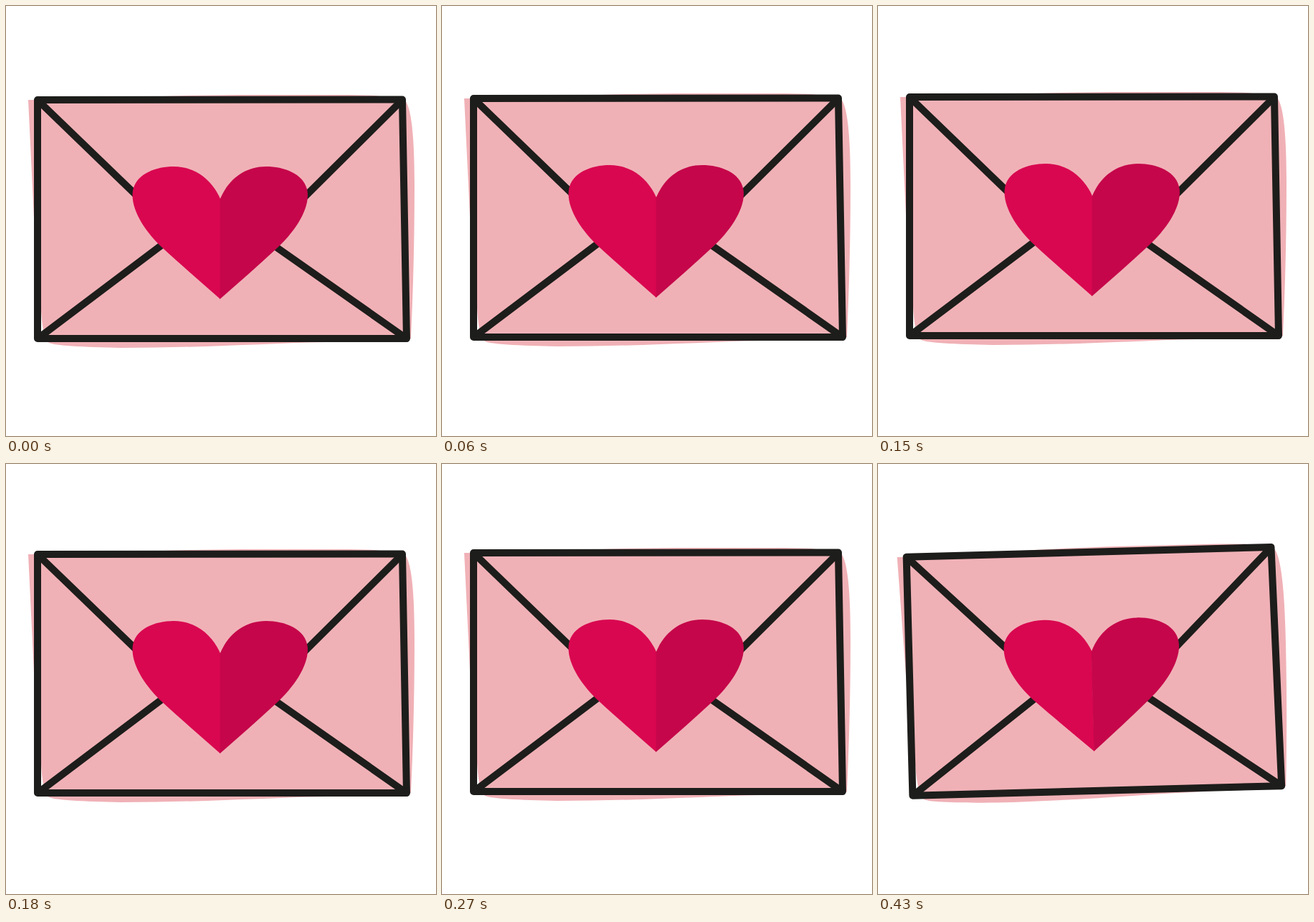
An HTML page for the animation above (630 ms loop, 600 by 600 pixels).

```html
<!DOCTYPE html>
<html lang="en">
<head>
<meta charset="utf-8">
<title>Love letter</title>
<style>
html, body { margin: 0; width: 100%; height: 100%; overflow: hidden; background: #fff; }
svg { display: block; width: 100%; height: 100%; }
</style>
</head>
<body>
<svg viewBox="0 0 600 600">
  <g id="letter">
    <path fill="#f0b1b6" d="M31 131 L44 131 L254 125 L327 124 H478 L515 125 L553 130
      C564 131 570 170 570 250 C570 330 568 400 565 464 L445 469
      C360 471 270 477 160 477 C110 476 62 474 59 469 C52 463 50 440 49 424 L39 296 Z"/>
    <g fill="none" stroke="#1d1d1b" stroke-width="10" stroke-linecap="round" stroke-linejoin="round">
      <path d="M47 134 L190 272 M550 134 L405 278 M47 462 L230 324 M556 462 L365 328"/>
      <path d="M44 131 L553 130.5 L559 464 H44 Z"/>
    </g>
    <path fill="#d90750" d="M299 269 C287 242 264 224 234 224 C207 224 176.5 236 176.5 264
      C176.5 288 196 317 219 338 C244 361 272 385 299 409 Z"/>
    <path fill="#c5064a" d="M298.5 270 C310 242 333 224 363 224 C390 224 421 236 421 264
      C421 288 401 317 378 338 C353 361 326 385 298.5 409 Z"/>
  </g>
</svg>
<script>
const letter = document.getElementById('letter');
const loop = 630;
const lifts = [30, 60, 120, 150, 180, 210, 270, 300]; // one pixel up at each time
const tiltAt = 430;

function draw(now) {
  const t = now % loop;
  const y = -lifts.filter(at => t >= at).length;
  const angle = t >= tiltAt ? -1.5 : 0;
  letter.setAttribute('transform', `translate(0 ${y}) rotate(${angle} 300 300)`);
}

let start;
function tick(now) {
  start ??= now;
  draw(Math.max(0, now - start));
  requestAnimationFrame(tick);
}
draw(0);
requestAnimationFrame(tick);
</script>
</body>
</html>
```
